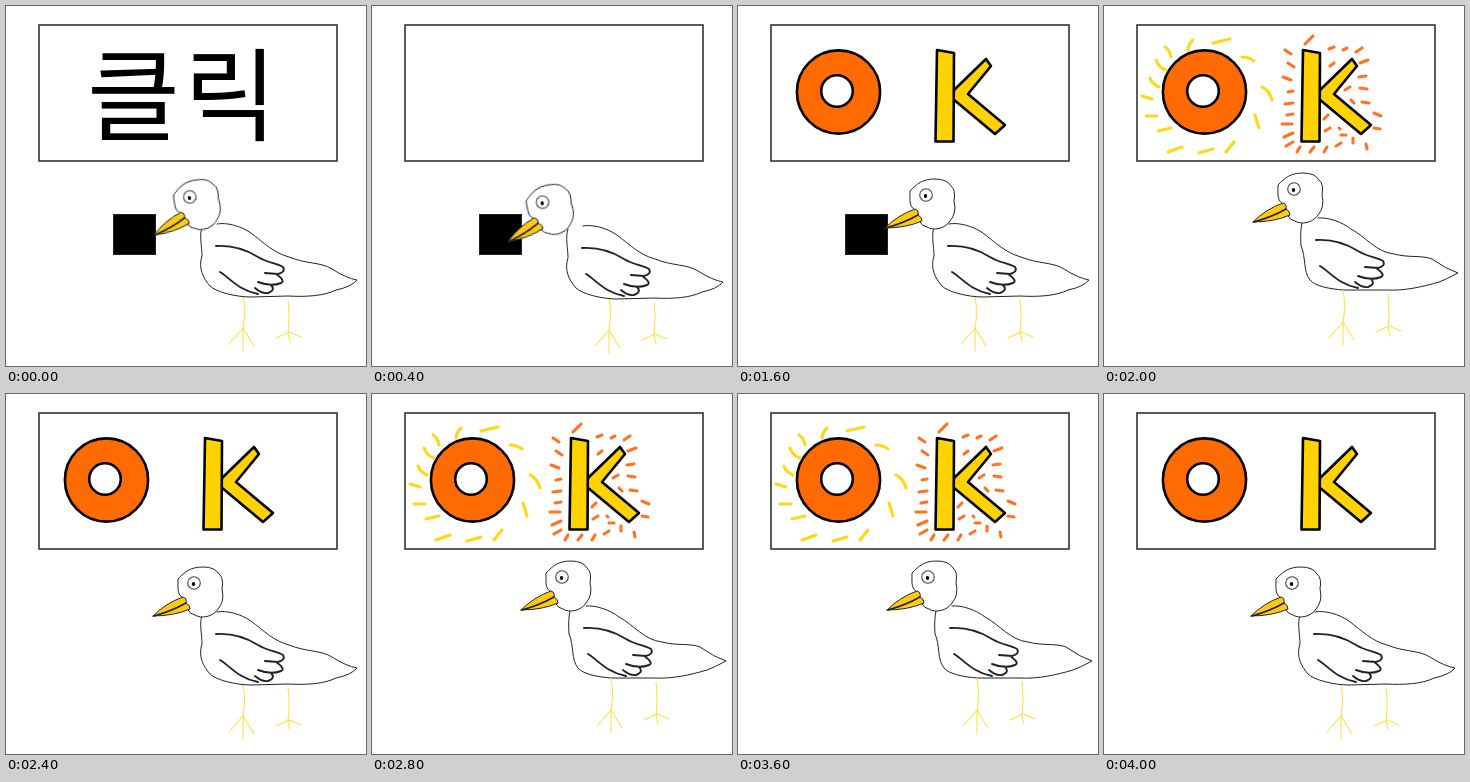
An HTML page for the animation above (4.4 s loop, 360 by 360 pixels).

```html
<!DOCTYPE html>
<html lang="ko">
<head>
<meta charset="utf-8">
<title>클릭</title>
<style>
  html, body { margin: 0; width: 100%; height: 100%; overflow: hidden; background: #fff; }
  svg { display: block; width: 100vw; height: 100vh; }
  g, path, text, rect, circle { animation: 4.4s step-end infinite; }
  path { fill: none; stroke-linecap: round; stroke-linejoin: round; }

  .label { font: 350 101px "Noto Sans CJK KR", "Noto Sans CJK", "Noto Sans CJK JP", sans-serif; letter-spacing: 4px; animation-name: label; }
  .button { animation-name: button; }
  .o { animation-name: o; }
  .k { animation-name: k; }
  .flash { animation-name: flash; }
  .calm { animation-name: calm; }
  .bird { animation-name: bird; }
  .head { animation-name: head; transform-origin: 194px 198px; }

  .ink { stroke: #000; stroke-width: 2.6; }
  .thin { stroke: #222; stroke-width: 1; }
  .wing { stroke: #222; stroke-width: 1.9; }
  .legs { stroke: #ffdf45; stroke-width: 1.1; }
  .rays { stroke-width: 3.1; }

  /* eleven beats of 400 ms */
  @keyframes label { 0% { visibility: visible } 9.09%, 100% { visibility: hidden } }
  @keyframes button { 0% { visibility: visible } 45.45%, 100% { visibility: hidden } }
  @keyframes o { 0% { visibility: hidden } 18.18%, 100% { visibility: visible } }
  @keyframes k { 0% { visibility: hidden } 36.36%, 100% { visibility: visible } }
  @keyframes flash {
    0%, 54.54%, 72.72%, 90.9%, 100% { visibility: hidden }
    45.45%, 63.63%, 81.81% { visibility: visible }
  }
  @keyframes calm {
    0%, 54.54%, 72.72%, 90.9%, 100% { visibility: visible }
    45.45%, 63.63%, 81.81% { visibility: hidden }
  }
  @keyframes bird {
    0%, 18.18%, 36.36%, 54.54%, 72.72%, 90.9%, 100% { transform: none }
    9.09% { transform: translate(0, 2px) }
    27.27% { transform: translate(-1px, 0) }
    45.45%, 63.63%, 81.81% { transform: translate(2px, -6px) }
  }
  @keyframes head {
    0% { transform: translate(-3px, 1px) rotate(-8deg) }
    9.09%, 27.27% { transform: translate(-16px, 4px) rotate(-10deg) }
    18.18%, 36.36%, 100% { transform: none }
  }
</style>
</head>
<body>
<svg viewBox="0 0 360 360">
  <rect x="33" y="19" width="298" height="136" fill="#fff" stroke="#333" stroke-width="1.6"/>
  <text class="label" x="81" y="127">클릭</text>

  <g class="o">
    <circle class="ink" cx="100.5" cy="86" r="41.6" fill="#ff6b00"/>
    <circle class="ink" cx="99" cy="85" r="15.8" fill="#fff"/>
  </g>
  <g class="k">
    <path class="ink" style="fill:#ffd200" d="M216 84L248 53 253 60 230 88 267 119 257 128 215 93Z"/>
    <path class="ink" style="fill:#ffd200" d="M199 44L216 47 215.500 135.500 197.500 135.500Z"/>
  </g>
  <g class="flash">
    <path class="rays" stroke="#ffd81a" d="M84 44Q85 37 89 34M67 51Q66 44 61 41M109 37L126 33M138 51Q145 51 150 55M158 81Q165 84 168 94M151 109L155 122M122 146L130 136M95 147L109 143M64 146L78 141M54 125L67 122M42 110H53M38 90L48 93M46 72Q48 78 55 81M52 54Q55 62 62 64"/>
    <path class="rays" stroke="#ff7326" d="M201 38L209 30M181 44L187 48M184 57L190 61M179 71L187 74M184 86L189 85M181 98L189 97M183 109L189 108M178 118L188 118M180 131L189 127M182 140L189 136M193 146L196 141M206 146L210 141M220 146L223 141M232 140L237 137"/>
    <path class="rays" stroke="#ff7326" d="M225 43L230 41M226 60L230 57M239 44L243 42M252 46L258 42M256 57L264 54M255 71L262 70M256 82L263 83M258 96L265 97M270 107L277 110M270 122L276 123M262 138L263 143M249 132V137M237 129H242M235 122L236 123M221 125L226 122M220 113L224 109M241 84L246 81M247 94L250 97"/>
  </g>

  <rect class="button" x="107.500" y="208.500" width="42" height="40" fill="#000" stroke="#222"/>

  <path class="thin flash" d="M214 212C224 211 238 216 247 223C262 231 272 246 290 248C305 252 318 249 328 253Q342 263 354 267Q343 273 335 276C318 281 300 285 282 284L240 284C225 283 211 280 206 274C199 266 202 250 197 240Q196 225 198 217"/>
  <g class="bird">
    <path class="legs" d="M237 290Q240 306 237 322M223 338L237 322 248 340M237 322V345M282 294Q284 312 282 327M270 332L283 326 295 331M282 327L284 336"/>
    <path class="thin calm" d="M211 218C220 216 235 220 245 227C258 237 268 247 283 251C300 258 315 256 326 263Q340 272 351 274Q345 281 330 284C318 290 300 291 282 290L245 291C230 291 210 286 204 280C197 272 192 262 196 250C196 240 193 230 196 221"/>
    <path class="wing" d="M210 240C226 239 241 244 252 251C262 257 270 257 277 261Q280 266 272 268L259 267M270 268Q280 275 275 277Q265 281 252 276M265 279Q270 284 262 287Q256 288 249 282M214 266C224 272 232 284 252 288"/>
    <g class="head">
      <path class="thin" style="fill:#fff" d="M177 204C171 200 172 196 172 185C179 178 184 173 197 173Q209 173 213 180Q218 184 216 195Q219 207 212 215C207 223 195 225 189 221Q184 220 182 216"/>
      <path class="thin" style="fill:#ffcb12" d="M147 222Q160 209 177 203Q181 204 180 209Q184 211 184 215Q168 222 147 222Z"/>
      <path class="thin" style="stroke-width:1.6" d="M148 222Q166 217 180 209"/>
      <circle cx="188" cy="189" r="6.300" fill="#fff" stroke="#444" stroke-width="1.1"/>
      <ellipse cx="187.500" cy="190" rx="1.700" ry="2.100"/>
    </g>
  </g>
</svg>
</body>
</html>
```
